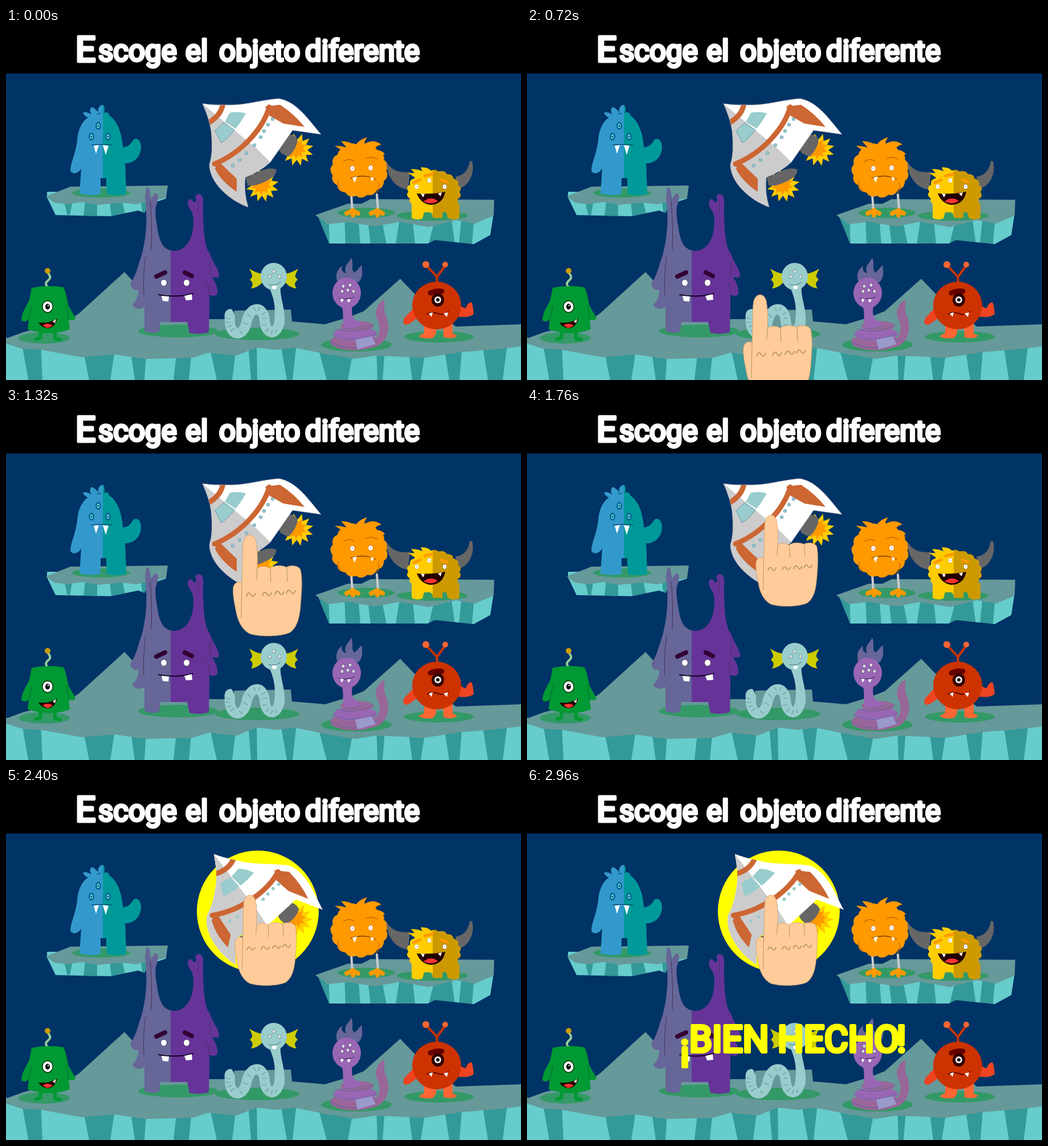
An HTML page with a canvas that plays this animation: 904 by 619 pixels, repeating every 3440 ms.

```html
<!DOCTYPE html>
<html lang="es">
<head>
<meta charset="utf-8">
<title>Escoge el objeto diferente</title>
<style>
html, body { margin: 0; width: 100%; height: 100%; overflow: hidden; background: #036; }
canvas { display: block; }
</style>
</head>
<body>
<canvas id="stage" width="904" height="619"></canvas>
<script>
const W = 904, H = 619, LOOP = 3440, STEP = 40;
const view = document.getElementById('stage').getContext('2d');
const layer = document.createElement('canvas');
layer.width = W;
layer.height = H;
let g = layer.getContext('2d');

const toPath = p => typeof p === 'string' ? new Path2D(p) : p;
const clamp = v => Math.min(1, Math.max(0, v));
const span = (t, from, to) => clamp((t - from) / (to - from));
const smooth = p => p * p * (3 - 2 * p);

function fill(color, p) {
  g.fillStyle = color;
  g.fill(toPath(p));
}
function line(color, width, p) {
  g.strokeStyle = color;
  g.lineWidth = width;
  g.lineCap = g.lineJoin = 'round';
  g.stroke(toPath(p));
}
function oval(color, x, y, rx, ry = rx) {
  g.fillStyle = color;
  g.beginPath();
  g.ellipse(x, y, rx, ry, 0, 0, Math.PI * 2);
  g.fill();
}
function duo(p, x, left, right) {
  p = toPath(p);
  fill(left, p);
  g.save();
  g.clip(p);
  g.fillStyle = right;
  g.fillRect(x, 0, W, H);
  g.restore();
}
function eye(x, y, r, ring, pupil = .7) {
  oval(ring, x, y, r + .7, r + 1.2);
  oval('#fff', x, y, r, r + .5);
  if (pupil) oval('#333', x, y, pupil);
}
function fur(cx, cy, rx, ry, n) {
  const p = new Path2D();
  const at = (a, k) => [cx + Math.cos(a) * rx * k, cy + Math.sin(a) * ry * k];
  p.moveTo(...at(0, .95));
  for (let i = 0; i < n; i++) {
    const a = i / n * Math.PI * 2, b = (i + 1) / n * Math.PI * 2;
    p.quadraticCurveTo(...at(a + (b - a) * .6, 1.09), ...at(b, .95));
  }
  p.closePath();
  return p;
}
function star(cx, cy, r1, r2, n) {
  const p = new Path2D();
  for (let i = 0; i < n * 2; i++) {
    const r = i % 2 ? r2 : r1, a = i / n * Math.PI + .3;
    p.lineTo(cx + Math.cos(a) * r, cy + Math.sin(a) * r);
  }
  p.closePath();
  return p;
}
function label(text, x, y, size, color, edge) {
  g.font = `400 ${size}px Roboto, sans-serif`;
  g.fillStyle = g.strokeStyle = color;
  g.lineWidth = edge;
  g.lineJoin = 'round';
  g.strokeText(text, x, y);
  g.fillText(text, x, y);
}

const ROCK = '#699', DARK = '#399', ICE = '#6cc', SHADE = '#396';

function cliff(outline, strips, top, bottom, base = ICE, stripe = DARK) {
  const p = toPath(outline);
  fill(base, p);
  g.save();
  g.clip(p);
  for (const [a, b, c, d] of strips) fill(stripe, `M${a} ${top}H${b}L${c} ${bottom}H${d}Z`);
  g.restore();
}

function ledges() {
  cliff('M72 298L87 329L183 331L232 321L243 325L251 310L281 300V288H72Z',
    [[100, 118, 112, 108], [140, 160, 160, 136], [181, 202, 210, 185], [236, 262, 248, 240]], 296, 331);
  fill(ROCK, 'M70 296L113 279L284 277L281 299L262 303L228 310L203 307L162 311L133 306L106 310L84 307Z');
  cliff('M547 330L567 379L740 379L753 373L821 380L850 364L856 325Z',
    [[566, 594, 596, 568], [618, 634, 640, 622], [658, 692, 684, 668], [713, 754, 742, 718], [781, 800, 795, 788], [822, 857, 848, 818]],
    330, 380, DARK, ICE);
  fill(ROCK, 'M543 329L600 309L624 309L640 301L857 302L856 330L823 344L790 338L742 350L690 341L648 349L600 341L565 345Z');
}

function ground() {
  cliff('M0 545H904V619H0Z',
    [[28, 61, 64, 39], [133, 193, 183, 146], [217, 247, 243, 226], [301, 327, 321, 294], [356, 405, 397, 370],
     [425, 440, 441, 430], [482, 510, 503, 493], [546, 612, 600, 563], [650, 666, 661, 652], [705, 738, 728, 713],
     [768, 801, 796, 778], [836, 880, 872, 846]], 555, 619);
  fill(ROCK, 'M0 546L30 535L112 513L128 502L208 429L250 475L290 512L395 512L401 497L500 495L502 516L560 521L603 508L628 498L692 441L735 486L790 525L904 521V560L850 566L798 570L735 580L650 576L612 582L560 573L505 562L476 566L440 562L405 576L356 571L327 580L245 582L190 574L133 579L62 566L28 564L0 555Z');
  oval(SHADE, 67, 545, 45, 10);
  oval(SHADE, 302, 533, 70, 11);
  oval(SHADE, 441, 538, 74, 11);
  oval(SHADE, 615, 557, 62, 12);
  oval(SHADE, 760, 543, 61, 10);
  oval(SHADE, 167, 290, 51, 8);
  oval(SHADE, 632, 325, 50, 9);
  oval(SHADE, 748, 330, 62, 9);
}

function blueOne() {
  duo('M168 150C162 148 158 152 154 158C146 160 138 156 135 149C141 146 147 151 150 152C146 146 147 141 151 139C156 141 159 145 162 148C161 141 164 136 170 135C174 139 173 145 172 149C179 147 181 151 181 154C194 162 203 182 205 210C214 210 219 204 222 199C225 193 233 193 236 203C240 221 228 238 209 238L211 292Q194 296 177 292L176 264H166V292Q146 296 129 291L132 247C126 257 116 258 113 251C113 238 122 222 125 198C127 174 136 160 150 154Z',
    170, '#39c', '#099');
  for (const [x, y] of [[150, 191], [179, 191], [162, 172]]) {
    oval('#069', x, y, 5, 7);
    oval('#6cc', x, y, 2.5, 4);
    oval('#036', x, y, 1.3);
  }
  line('#036', 1, 'M150 206Q168 203 186 206');
  fill('#fff', 'M154 207L163 206L158 221ZM170 206L180 207L175 223Z');
}

function purpleOne() {
  duo('M246 281C253 277 252 290 255 300L261 291C269 289 268 303 263 314C261 326 264 340 266 353C270 382 280 392 297 392C317 391 328 370 329 346C330 333 328 324 322 317C317 307 320 298 327 303C329 308 334 309 334 301C329 292 342 289 345 298C348 308 344 314 346 330C346 364 350 389 358 397C361 411 375 425 374 437C370 440 365 438 361 437C369 450 373 461 370 469C363 472 358 470 357 468L356 535Q340 540 322 536L318 517H271L269 534Q255 539 243 533V490C236 497 222 493 222 486C229 480 233 470 232 460C223 463 217 455 219 448C229 435 232 415 238 400C248 362 248 330 244 299Z',
    289, '#669', '#639');
  line('#435', 1, 'M253 305Q257 345 255 390M245 402Q240 435 242 470M358 410Q360 426 357 434M351 445Q358 455 356 466M338 304L337 322');
  line('#303', 8, 'M264 437L279 430M314 430L326 436');
  eye(277, 448, 5, '#435', 0);
  eye(317, 448, 5, '#435', 0);
  line('#102', 2, 'M268 469Q298 475 328 467');
  fill('#fff', 'M273 471L286 472L285 481L275 480ZM313 471L326 468L327 478L316 479Z');
}

function greenOne() {
  line('#9c9', 4, 'M73 456C62 442 87 446 73 430');
  oval('#c90', 73, 427, 5);
  line('#093', 6, 'M61 532L60 545L53 547M86 532L86 546L95 548');
  fill('#093', 'M45 457Q72 451 101 456C106 466 107 478 110 489L122 510Q119 517 110 512L112 530Q78 543 38 530L40 512Q34 519 27 514C27 500 37 488 41 478Z');
  line('#063', 1, 'M46 488L40 512M106 487L110 512');
  oval('#030', 73, 490, 10, 11);
  oval('#fff', 73, 490, 8.5, 9.5);
  oval('#000', 73, 490, 4, 5);
  oval('#fff', 74, 488, 1.3);
  fill('#200', 'M57 518Q75 520 90 511Q85 528 73 528Q62 527 57 518Z');
  fill('#f33', 'M64 523Q73 517 82 523Q77 528 71 527Z');
  fill('#fff', 'M82 516L88 512L86 519Z');
}

function snake() {
  const ear = 'M449 432C441 431 433 427 427 423C431 432 434 436 431 439L428 443C434 447 434 452 430 458C440 457 446 452 451 446Z';
  fill('#cc0', ear);
  g.save();
  g.translate(940, 0);
  g.scale(-1, 1);
  fill('#cc0', ear);
  g.restore();
  line('#9cc', 18, 'M393 508C390 543 416 546 422 518C428 487 452 488 454 514C456 541 476 542 480 516');
  fill('#9cc', 'M384 512C382 500 387 494 395 494Q400 496 400 510ZM461 454H482C480 474 491 492 489 520Q480 530 471 515C474 490 470 474 461 454Z');
  oval('#9cc', 470, 437, 23, 24);
  line('#699', 1.2, 'M386 509L392 512M386 517L393 518M389 526L396 523M394 533L401 528M410 533L414 537M417 518L424 522M424 503L430 509M434 491L438 497M446 491L443 497M455 500L449 504M457 510L451 511M450 523L457 521M456 534L461 529M465 538L468 531M474 536L474 530');
  for (const [x, y] of [[470, 428], [463, 437], [480, 437]]) eye(x, y, 2.3, '#477');
  line('#477', 1, 'M461 451Q471 455 482 447');
  fill('#fff', 'M467 453H476L474 459H468Z');
}

function coiled() {
  const skin = '#9966b4', edge = '#669';
  fill(edge, 'M581 445C578 432 582 424 590 418C588 427 592 430 597 431C592 418 600 416 606 404C611 416 605 422 611 430C616 428 618 422 625 417C624 427 629 435 619 447Z');
  fill('#969', 'M638 552C658 545 658 528 653 514C645 501 651 486 663 478C667 486 661 493 666 504C677 529 669 559 641 562Z');
  oval('#969', 611, 552, 42, 15);
  oval(skin, 613, 538, 38, 12);
  oval('#969', 616, 524, 29, 9);
  fill(skin, 'M586 482H610C604 503 607 514 625 519Q615 531 595 527C588 515 596 497 586 482Z');
  oval(skin, 598, 466, 25, 27);
  line(edge, 1.2, 'M574 540Q610 556 651 537M579 529Q615 540 646 522M595 527Q606 532 625 523M570 552Q610 575 652 549');
  fill('#99c', 'M613 548L642 542L649 556L617 565Z');
  for (const [x, y] of [[592, 454], [604, 452], [590, 463], [610, 463], [600, 461]]) eye(x, y, 2.3, '#436');
  line('#436', 1.2, 'M584 475Q598 479 611 473');
  fill('#fff', 'M587 476L593 477L589 483ZM599 477H605L603 482H600Z');
}

function redOne() {
  line('#c30', 4, 'M757 447L756 437L739 419M757 437L770 419');
  oval('#f63', 737, 416, 6);
  oval('#f63', 771, 416, 5);
  fill('#e42', 'M716 492L724 508Q708 522 701 522Q695 519 699 510ZM792 482Q800 492 807 493Q810 483 817 482Q820 488 821 503Q812 511 790 507Z');
  fill('#f63', 'M734 520H755V537L750 545Q735 548 724 542L734 536ZM767 520H784L784 537L792 541Q786 548 768 544Z');
  oval('#c30', 756, 488, 43, 42);
  line('#600', 9, 'M745 466Q755 461 765 463');
  oval('#300', 758, 478, 11, 12);
  oval('#fff', 758, 478, 6);
  oval('#000', 758, 478, 3);
  line('#400', 1.5, 'M739 503Q748 498 758 502T777 499');
  fill('#fff', 'M742 502L749 500L747 508ZM768 502L776 500L774 508Z');
}

function orangeOne() {
  line('#ccc', 4, 'M606 293L608 321M651 293L653 319');
  for (const x of [609, 652]) {
    line('#f90', 8, `M${x} 321L${x - 11} 326M${x} 321L${x} 329M${x} 321L${x + 9} 326`);
  }
  fill('#f90', fur(620, 250, 50, 48, 15));
  fill('#f90', 'M594 218L577 207Q587 207 598 210L588 199Q604 199 613 207Q618 197 634 192Q629 199 629 204Q645 194 659 205Q649 207 646 214Q660 214 665 222L640 232Z');
  line('#c60', 1.3, 'M592 235Q602 228 611 234M631 230Q641 224 652 231M583 270Q581 280 589 285M653 272Q658 282 650 290');
  eye(608, 247, 4, '#c60');
  eye(640, 246, 4, '#c60');
  line('#630', 1.2, 'M605 264Q628 256 649 266');
  fill('#fff', 'M608 263L616 261L612 272ZM640 262L646 264L642 270Z');
}

function hornedOne() {
  fill('#666', 'M668 235C674 248 689 256 709 253L706 284C686 283 667 262 668 235ZM814 234C812 252 800 261 789 261L794 283C813 278 824 255 818 234Z');
  const body = fur(751, 288, 47, 38, 18);
  body.addPath(new Path2D('M712 308H796L796 334Q786 339 776 334L773 324H734L731 335Q721 339 712 334ZM744 315H766V334H750ZM718 263L706 255H717L711 248Q724 248 731 252L728 245Q741 244 747 252Z'));
  duo(body, 749, '#fc0', '#c90');
  line('#f90', 5, 'M735 260L748 257M716 272L727 267M764 267L774 271');
  eye(743, 268, 3.5, '#c90');
  eye(721, 279, 3.5, '#c90');
  eye(770, 279, 3.5, '#850');
  fill('#200', 'M721 291Q745 293 771 288Q767 310 745 311Q728 309 721 291Z');
  fill('#f33', 'M733 305Q745 295 758 304Q747 312 733 305Z');
  fill('#fff', 'M728 291L735 292L732 298ZM758 291L765 289L763 296Z');
}

function scene() {
  g.fillStyle = '#036';
  g.fillRect(0, 0, W, H);
  g.fillStyle = '#000';
  g.fillRect(0, 0, W, 80);
  label('E', 122, 59, 62, '#fff', 5);
  for (const [word, x] of [['scoge', 162], ['el', 315], ['objeto', 374], ['diferente', 525]]) {
    label(word, x, 58, 51, '#fff', 4.5);
  }
  ledges();
  ground();
  [blueOne, purpleOne, greenOne, snake, coiled, redOne, orangeOne, hornedOne].forEach(draw => draw());
}

const HULL = new Path2D('M345 133Q365 136 384 135C418 137 443 127 479 124C511 130 530 160 553 187L503 180L464 236Q447 252 420 263Q417 288 425 315C390 302 357 271 357 240Q364 220 360 181Q357 160 345 133Z');

function rocket(turn) {
  g.save();
  g.translate(432, 214);
  g.rotate(turn * Math.PI / 180);
  g.translate(-432, -214);
  for (const [x, y] of [[511, 214], [450, 277]]) {
    fill('#fc0', star(x, y, 29, 18, 12));
    fill('#f90', star(x - 2, y - 2, 19, 12, 10));
  }
  fill('#666', 'M492 188Q502 184 512 195Q511 212 496 226Q484 223 479 215ZM421 264L452 249Q466 245 475 249Q474 262 455 270Q437 279 424 277Z');
  fill('#fff', HULL);
  g.save();
  g.clip(HULL);
  fill('#ccc', 'M345 133L400 179L440 212L468 240L430 330H330Z');
  line('#c63', 9, 'M381 131Q379 154 353 168M462 139C452 175 415 219 366 239');
  fill('#9cc', 'M393 149Q407 146 421 150Q413 165 403 177L384 165ZM382 167L401 179Q391 193 378 202L367 181Z');
  g.restore();
  fill('#c63', 'M455 138L481 135Q507 152 524 174L487 168L462 154ZM371 232L388 249L405 265V288Q379 271 367 248Z');
  if (!turn) {
    line('#69a', 1, 'M382 167L401 179Q391 193 378 202L367 181Z');
    line('#99a', .7, HULL);
  }
  for (const [x, y] of [[468, 160], [460, 170], [453, 181], [447, 192], [436, 206], [422, 220], [410, 232], [398, 242]]) {
    if (!turn) oval('#58a', x, y, 3);
    oval('#9cc', x, y, turn ? 3 : 2.4);
  }
  g.restore();
}

// Distance travelled upward: speed up, cruise, slow down.
function travel(t) {
  const speed = .41, up = 708, brake = 1310, stop = 1500;
  if (t < up) return speed * t * t / (2 * up);
  const cruise = speed * (Math.min(t, brake) - up / 2);
  const d = Math.max(0, Math.min(t, stop) - brake);
  return cruise + speed * (d - d * d / (2 * (stop - brake)));
}

function hand(t) {
  const press = span(t, 1500, 1780);
  const y = 619 - travel(t);
  const x = 428 - (y - 222) * .077 - press * 2.6;
  const size = 1 - press * .105;
  g.save();
  g.translate(x, y);
  g.scale(size, size);
  const shape = new Path2D('M-14 84C-12 55 -14 25 -11 11C-7 -3 7 -4 11 11C14 28 14 45 13 59C18 54 30 54 35 59C41 53 57 53 64 57C70 53 85 53 89 61C93 78 91 101 89 126C87 150 81 165 70 172C54 179 20 180 0 174C-15 166 -22 150 -25 130C-28 115 -30 105 -29 92C-27 84 -20 81 -14 84Z');
  fill('#fc9', shape);
  line('#c96', .8, shape);
  line('#b96', 1.2, 'M-14 84L-15 146M13 59L12 78M36 59L37 83M65 57L66 82');
  for (const [a, b] of [[2, 105], [30, 104], [52, 102], [72, 100]]) {
    line('#b96', 2, `M${a - 8} ${b + 3}Q${a - 4} ${b - 7} ${a} ${b}T${a + 8} ${b - 2}`);
  }
  g.restore();
}

const sheet = document.createElement('canvas');
sheet.width = W;
sheet.height = H;

// Letters are composed apart so that edge and fill fade as one.
function praise() {
  for (const [text, x, y] of [['¡', 269, 478], ['BIEN', 285, 464], ['HECHO', 440, 464], ['!', 649, 464]]) {
    label(text, x, y, 64, '#ff0', 6);
  }
}

scene();
g = sheet.getContext('2d');
praise();
g = view;

function frame(now) {
  const t = Math.floor(now % LOOP / STEP) * STEP;
  g.drawImage(layer, 0, 0);
  g.globalAlpha = span(t, 1860, 2360);
  oval('#ff0', 442, 217, 107);
  g.globalAlpha = 1;
  rocket(12.6 * smooth(span(t, 2070, 2410)));
  hand(t);
  g.globalAlpha = span(t, 2400, 2930);
  g.drawImage(sheet, 0, 0);
  g.globalAlpha = 1;
  requestAnimationFrame(frame);
}
requestAnimationFrame(frame);
</script>
</body>
</html>
```
